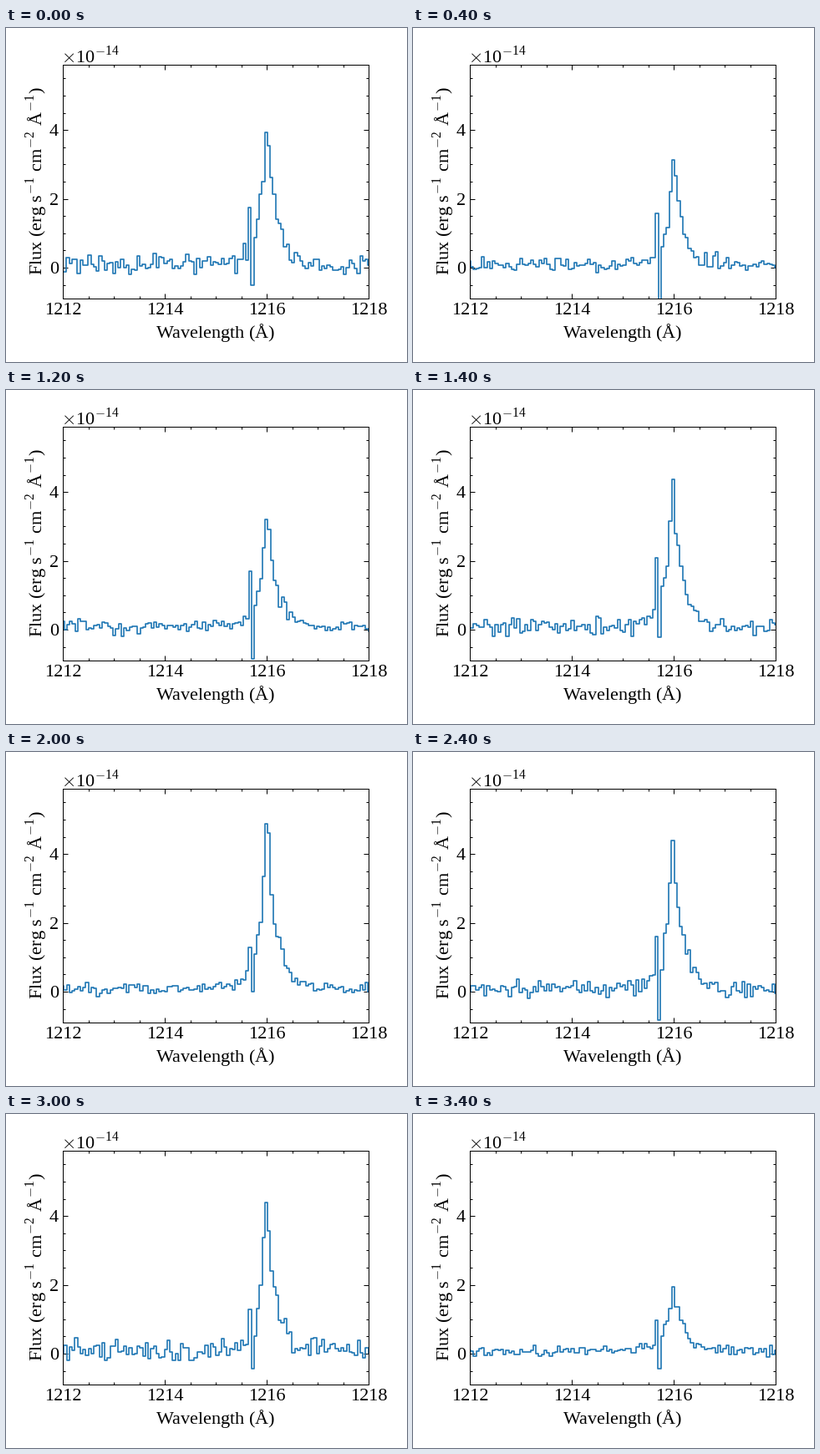
A matplotlib script for the animation above (3600 ms loop, 480 by 400 pixels).

```python
import numpy as np
import matplotlib.pyplot as plt
from matplotlib.animation import FuncAnimation
from matplotlib.ticker import MultipleLocator

W, H, DPI = 480, 400, 100
INTERVAL = 200
BIN = 0.0533              # bin width in angstrom
LINE = 1215.98            # centre of the emission line
ABSORBED = 1215.71        # dip on the blue side, next to a narrow spike
LEFT, RIGHT, TOP, BOTTOM = 68, 434, 44, 324

# Height of the line and depth of the dip in each exposure
HEIGHTS = [3.93, 2.9, 3.13, 3.4, 3.17, 3.45, 3.2, 4.38, 4.1,
           3.9, 4.87, 4.0, 4.4, 3.78, 3.5, 4.4, 1.9, 1.95]
DIPS = [-.5, -.3, -1.1, -.1, -.17, -.87, -.85, -.22, -.68,
        -.33, 0, -.1, -.82, -.68, -.3, -.43, -.63, -.45]

plt.rcParams.update({
    "font.family": "Liberation Serif",
    "mathtext.fontset": "cm",
    "font.size": 16,
    "axes.linewidth": 0.72,
})


def make_spectrum(i):
    """Asymmetric line with a blue spike and dip over a noisy continuum."""
    rng = np.random.default_rng(40 + i)
    height, dip = HEIGHTS[i], DIPS[i]

    n = np.arange(-85, 60)
    wave = LINE + rng.uniform(-0.02, 0.02) + BIN * n

    # Steep blue edge, slower decay on the red side
    shape = np.exp(-np.abs(n) / np.where(n < 0, 2.3, 3.6))
    shape *= 1 + np.where(n == 0, 0, rng.normal(0, 0.09, n.size))
    line = height * np.minimum(shape, np.where(n == 0, 1, 0.9))

    sigma = rng.uniform(0.07, 0.17)
    wing = 0.1 * np.exp(-((wave - ABSORBED) / 0.6) ** 2)
    noise = 0.08 + wing + rng.normal(0, sigma, n.size)
    flux = line + np.clip(noise, -0.2, None) * (n != 0)

    at = np.argmin(abs(wave - ABSORBED))
    flux[at] = dip
    flux[at - 1] = height * rng.uniform(0.25, 0.55)
    flux[at - 2] = height * rng.uniform(0.05, 0.15)
    return wave, flux


spectra = [make_spectrum(i) for i in range(len(HEIGHTS))]


def label(x, y, text, **style):
    """Text whose baseline sits at a pixel counted from the top left."""
    fig.text(x / W, 1 - y / H, text, va="baseline",
             rotation_mode="anchor", **style)


def power(n):
    """Superscript with upright digits and a long minus sign."""
    return rf"$^{{-\mathregular{{{n}}}}}$"


fig = plt.figure(figsize=(W / DPI, H / DPI), dpi=DPI, facecolor="white")
ax = fig.add_axes([LEFT / W, 1 - BOTTOM / H,
                   (RIGHT - LEFT) / W, (BOTTOM - TOP) / H])
ax.set_xlim(1212, 1218)
ax.set_ylim(-0.9, 5.9)
for axis in (ax.xaxis, ax.yaxis):
    axis.set_major_locator(MultipleLocator(2))
    axis.set_minor_locator(MultipleLocator(0.5))
    axis.set_major_formatter("{x:.0f}")
ax.tick_params(which="both", direction="in", top=True, right=True, width=0.72)
ax.tick_params(which="major", length=4.3)
ax.tick_params(which="minor", length=2.2)

label(66, 42, r"$\times$10" + power(14), ha="left")
label(250.5, 371, r"W$\hspace{-0.09}$avelength (Å)", ha="center")
label(44, 183, f"Flux (erg s{power(1)} cm{power(2)} Å{power(1)})",
      ha="center", rotation=90)

trace, = ax.plot([], [], drawstyle="steps-mid", color="#1f77b4", lw=1.2)


def update(i):
    trace.set_data(*spectra[i])
    return trace,


anim = FuncAnimation(fig, update, frames=len(spectra), interval=INTERVAL,
                     init_func=lambda: update(0), repeat=True,
                     repeat_delay=0, blit=False)
plt.show()
```
